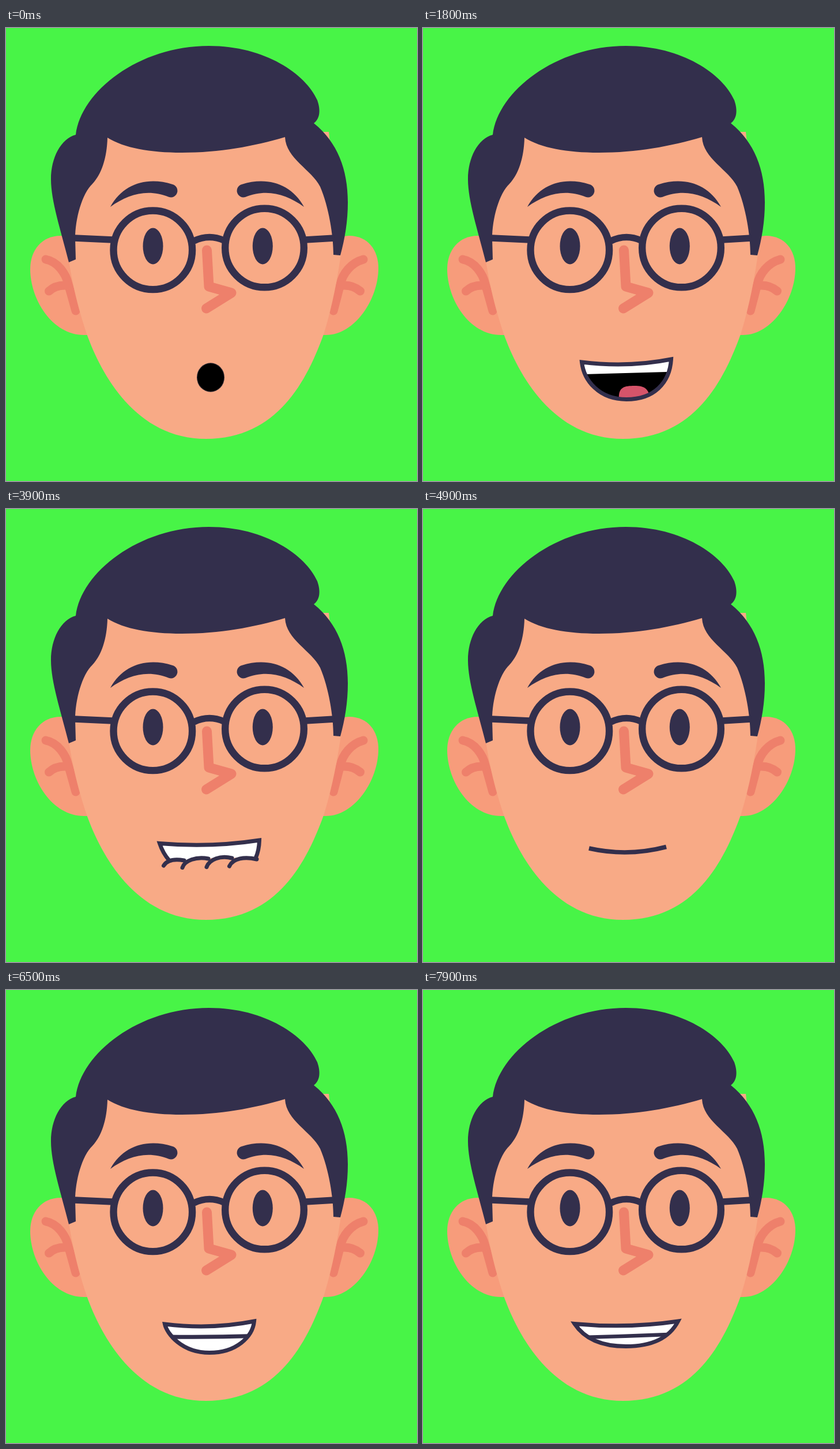
Write an HTML page with a canvas that moves like this. It is 713x785 px and loops after 8 s.

```html
<!DOCTYPE html>
<html lang="en">
<head>
<meta charset="utf-8">
<title>Talking head</title>
<style>
html, body { margin: 0; width: 100%; height: 100%; overflow: hidden; background: #48f447; }
canvas { display: block; }
</style>
</head>
<body>
<canvas id="stage" width="713" height="785"></canvas>
<script>
const ctx = document.getElementById('stage').getContext('2d');
const INK = '#332f4c', SKIN = '#f8aa86', EAR = '#f79c7b', BLUSH = '#ee806b';
const LOOP = 8000, HOLD = 200;

// One letter per mouth shape, each held for HOLD ms.
const SPEECH = 'OEAWMBFEWABOMEWBAMEFBWOEMMBAEWFBEOMWABEW';

function fill(d, color) {
  ctx.fillStyle = color;
  ctx.fill(new Path2D(d));
}

function stroke(d, color, width, cap = 'butt', join = 'miter') {
  ctx.strokeStyle = color;
  ctx.lineWidth = width;
  ctx.lineCap = cap;
  ctx.lineJoin = join;
  ctx.stroke(new Path2D(d));
}

function ellipse(x, y, rx, ry, color) {
  ctx.fillStyle = color;
  ctx.beginPath();
  ctx.ellipse(x, y, rx, ry, 0, 0, Math.PI * 2);
  ctx.fill();
}

function ring(x, y) {
  ctx.strokeStyle = INK;
  ctx.lineWidth = 12.4;
  ctx.beginPath();
  ctx.arc(x, y, 68.3, 0, Math.PI * 2);
  ctx.stroke();
}

function drawEars() {
  fill('M125 372 Q112 360 95 360 C62 360 42 385 42 418 C42 470 80 532 135 532 L160 532Z', EAR);
  fill('M565 372 Q578 360 595 360 C628 360 646 385 646 416 C646 470 605 532 555 532 L530 532Z', EAR);
  const folds = [
    'M69 401 C90 405 104 426 108 444 Q114 464 121 490',
    'M74.5 456 Q86 445 105 446',
    'M620 401 C598 407 584 426 580 444 Q575 464 568 490',
    'M614.5 456 Q602 445 584 446'
  ];
  folds.forEach(d => stroke(d, BLUSH, 15, 'round', 'round'));
}

function drawFace() {
  fill('M104 360 C108 410 120 472 140 530 C165 600 225 712 347 712 ' +
       'C470 712 522 612 552 528 C566 482 576 430 582 385 L560 180 L130 180Z', SKIN);
}

function drawHair() {
  fill('M121 185 C130 110 230 31 352 31 C450 31 520 80 540 125 C546 142 545 157 534 165 ' +
       'C575 198 593 245 593 302 C593 335 588 365 580 394 L568 393 ' +
       'C568 360 560 310 545 275 C530 245 486 227 484 189 ' +
       'C430 205 370 216 305 216 C250 216 205 208 176 190 C175 225 166 253 150 270 ' +
       'C132 287 120 330 120 365 L121 401 L109 406 C95 350 78 300 78 262 C78 225 95 192 121 185Z', INK);
}

function drawBrow() {
  fill('M181 310 C203 270 245 257 289 271 A10.9 10.9 0 0 1 283 293 C245 278 212 288 181 310Z', INK);
}

function drawFeatures() {
  drawBrow();
  ctx.save();
  ctx.translate(698, 0);
  ctx.scale(-1, 1);
  drawBrow();
  ctx.restore();

  ellipse(255, 378, 17.5, 31.5, INK);
  ellipse(445.3, 378, 17.5, 31.5, INK);
  stroke('M348.5 385 L352 448 L391 459 L347.5 486', BLUSH, 17, 'round', 'round');
  ring(254.8, 384.8);
  ring(448.5, 381);
  stroke('M326 369 Q352 356.5 378 368', INK, 11.5);
  stroke('M119 364 L185 367', INK, 11.5);
  stroke('M519 367 L570 364', INK, 11.5);
}

// Fills a mouth outline, paints its inside clipped, then outlines it.
function mouth(d, color, inside) {
  ctx.save();
  ctx.clip(new Path2D(d));
  fill(d, color);
  inside();
  ctx.restore();
  stroke(d, INK, 7);
}

function bowl(base) {
  return `M275.5 579 Q355 589 430.5 574 C428 ${base - 28} 400 ${base} 353 ${base} ` +
         `C305 ${base} 279 ${base - 33} 275.5 579Z`;
}

function openMouth(base) {
  mouth(bowl(base), '#000', () => {
    fill('M270 570 H440 V595.5 L280 600Z', '#fff');
    const top = base - 23.5;
    fill(`M340 ${base} C338 ${top + 2} 350 ${top} 367 ${top} ` +
         `C384 ${top} 392 ${top + 5} 394 ${base}Z`, '#d6546a');
  });
}

const mouths = {
  O() {
    ellipse(355, 605.5, 24, 25.2, '#332f38');
    ellipse(355, 605.5, 23, 24.2, '#000');
  },
  A() { openMouth(643.5); },
  B() { openMouth(634.5); },
  E() {
    mouth(bowl(628.5), '#fff', () => stroke('M280 601 Q355 602 430 599.5', INK, 7));
  },
  W() {
    const d = 'M263 578.5 Q355 587 442.5 574 C428 602 398 617.5 352 617.5 C308 617.5 280 604 263 578.5Z';
    mouth(d, '#fff', () => {
      stroke('M276 602 Q352 600 425 597', INK, 6.5);
    });
  },
  F() {
    fill('M266 579 Q355 589 440 574 L434 605 Q412 602 391 605 Q370 602 350 606 Q328 604 308 609 L283 608Z', '#fff');
    stroke('M283 609 Q272 596 266.5 579.5 Q355 587 439.5 574 Q439 592 433 605', INK, 7);
    const lips = [
      'M273.5 618 C279 609 292 606 309 609',
      'M306 621.5 C310 609 330 602 351 606',
      'M348 620.5 C353 607 372 600 392 605',
      'M387.5 619 C394 605 414 602 435 607'
    ];
    lips.forEach(l => stroke(l, INK, 7, 'round', 'round'));
  },
  M() { stroke('M288 588 Q355 603 422 585.5', INK, 7.5); }
};

function draw(now) {
  const t = now % LOOP;
  ctx.fillStyle = '#48f447';
  ctx.fillRect(0, 0, 713, 785);
  drawEars();
  drawFace();
  drawHair();
  drawFeatures();
  mouths[SPEECH[Math.floor(t / HOLD)]]();
}

let start = null;
function tick(now) {
  if (start === null) start = now;
  draw(now - start);
  requestAnimationFrame(tick);
}
draw(0);
requestAnimationFrame(tick);
</script>
</body>
</html>
```
